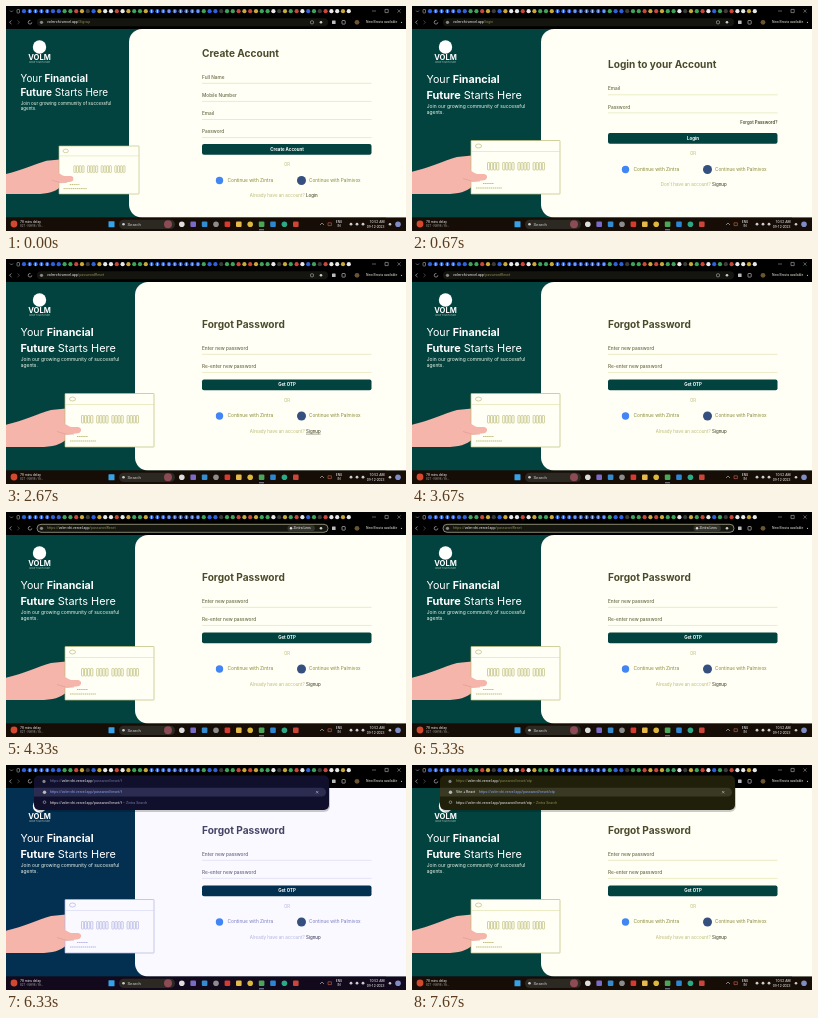
Animation of 400 by 225 pixels, one loop 8000 ms. Source, as an HTML page with a canvas:

```html
<!DOCTYPE html>
<html lang="en">
<head>
<meta charset="utf-8">
<title>Account pages</title>
<style>
html, body { margin: 0; width: 100%; height: 100%; overflow: hidden; background: #000; }
canvas { display: block; width: 400px; height: 225px; }
</style>
</head>
<body>
<canvas id="stage"></canvas>
<script>
const canvas = document.getElementById('stage');
const ratio = window.devicePixelRatio || 1;
canvas.width = 400 * ratio;
canvas.height = 225 * ratio;
const ctx = canvas.getContext('2d');
ctx.scale(ratio, ratio);
ctx.textBaseline = 'middle';

const LOOP = 8000;
const HOST = 'volm-chi.vercel.app';

const warm = {
  panel: '#03433f', paper: '#fffff6', ink: '#4b4b2c', label: '#6a6a45', accent: '#8a8a35',
  faint: '#bcbc78', rule: '#dedea4', menu: '#1f1f0a', row: '#3a3a24', dim: '#8c8c55', bar: '#160d06'
};
const cool = {
  panel: '#032f50', paper: '#f9f9ff', ink: '#444466', label: '#656585', accent: '#7d7dc4',
  faint: '#b2b2e2', rule: '#d6d6f2', menu: '#10102c', row: '#2c2c50', dim: '#7777a8', bar: '#120a1c'
};
let theme = warm;

const wideCard = { edge: 129, zoom: 1, card: [59, 134.5, 89, 53.5] };
const pages = {
  signup: {
    path: '/Signup', title: 'Create Account', titleY: 47.5, fieldY: 71.5,
    fields: ['Full Name', 'Mobile Number', 'Email', 'Password'],
    button: 'Create Account', buttonY: 138, ask: 'Already have an account? ', link: 'Login',
    edge: 123, zoom: 0.92, card: [53, 140, 80, 48]
  },
  login: {
    path: '/login', title: 'Login to your Account', titleY: 59, fieldY: 83,
    fields: ['Email', 'Password'], extra: 'Forgot Password?',
    button: 'Login', buttonY: 127, ask: "Don't have an account? ", link: 'Signup', ...wideCard
  },
  reset: {
    path: '/passwordReset', title: 'Forgot Password', titleY: 66, fieldY: 89.5,
    fields: ['Enter new password', 'Re-enter new password'],
    button: 'Get OTP', buttonY: 120.5, ask: 'Already have an account? ', link: 'Signup', ...wideCard
  }
};

function random(seed) {
  return () => (seed = (seed * 16807) % 2147483647) / 2147483647;
}

function box(x, y, w, h, fill, radius = 0, stroke) {
  ctx.beginPath();
  ctx.roundRect(x, y, w, h, radius);
  if (fill) { ctx.fillStyle = fill; ctx.fill(); }
  if (stroke) { ctx.strokeStyle = stroke; ctx.lineWidth = 0.7; ctx.stroke(); }
}

function dot(x, y, r, fill) {
  ctx.beginPath();
  ctx.arc(x, y, r, 0, 7);
  ctx.fillStyle = fill;
  ctx.fill();
}

function line(points, color, width = 0.6) {
  ctx.beginPath();
  points.forEach(([x, y]) => ctx.lineTo(x, y));
  ctx.strokeStyle = color;
  ctx.lineWidth = width;
  ctx.stroke();
}

function cross(x, y, r, color) {
  line([[x - r, y - r], [x + r, y + r]], color);
  line([[x + r, y - r], [x - r, y + r]], color);
}

// Draws text and returns the x where it ends.
function text(str, x, y, size, color, { weight = 400, align = 'left', family = 'Inter' } = {}) {
  ctx.font = `${weight} ${size}px ${family}, sans-serif`;
  ctx.textAlign = align;
  ctx.fillStyle = color;
  ctx.fillText(str, x, y);
  return x + ctx.measureText(str).width;
}

const ui = (str, x, y, color = '#ddd', size = 3.6, align) =>
  text(str, x, y, size, color, { family: 'Roboto', align });

function drawTabs() {
  const next = random(23);
  const colors = ['#2f62d8', '#e8e8e8', '#c8483c', '#3fa35b', '#c8a93a', '#3b3b3b'];
  box(0, 0, 400, 23, '#000');
  line([[4, 4.5], [5.5, 6], [7, 4.5]], '#aaa');
  box(11, 3.5, 2.5, 3.5, null, 0.5, '#999');
  for (let x = 18; x < 348; x += 5.8) {
    const color = colors[Math.floor(next() * colors.length)];
    const blue = (x > 20 && x < 46) || (x > 140 && x < 196);
    dot(x, 5.2, 2.1, blue ? '#2f62d8' : color);
    if (blue) line([[x, 3.8], [x, 6.8]], '#fff', 0.7);
  }
  line([[366, 5], [370, 5]], '#999');
  box(379, 3.4, 3.2, 3.2, null, 0, '#999');
  cross(393, 5.1, 1.6, '#999');
}

function drawToolbar(path, focused) {
  line([[5.5, 14.5], [3.5, 16.3], [5.5, 18]], '#ccc');
  line([[11.5, 14.5], [13.5, 16.3], [11.5, 18]], '#666');
  ctx.beginPath();
  ctx.arc(24, 16.3, 1.8, 0, 5);
  ctx.strokeStyle = '#ccc';
  ctx.stroke();
  box(31, 12.3, 291, 8, '#151510', 4, focused ? '#bcbc9c' : null);
  dot(35.5, 16.3, 1.6, '#888');
  const start = focused ? ui('https://', 41, 16.4, theme.dim) : 41;
  ui(path, ui(HOST, start, 16.4, '#f4f4f4'), 16.4, theme.dim);
  if (focused) {
    box(281.5, 13.2, 27.5, 6.2, '#33332c', 3.1);
    dot(285, 16.3, 1.2, '#ddd');
    ui('Zintra Lens', 287.5, 16.4, '#eee', 3.5);
  } else {
    box(304.5, 14.8, 3, 3, null, 1, '#aaa');
  }
  dot(315, 16.3, 1.3, '#ccc');
  box(326, 14.5, 3.6, 3.6, '#bbb', 0.5);
  box(336, 14.5, 3.2, 3.6, null, 0.5, '#bbb');
  dot(351, 16.3, 2.4, '#6b5530');
  ui('New Brovia available', 360, 16.4, '#e6e6d8', 3.4);
  dot(395.5, 16.3, 0.6, '#ccc');
}

function drawHandCard([x, y, w, h]) {
  const skin = '#f6b5ab', ink = theme.faint;
  ctx.save();
  ctx.translate(x, y);
  ctx.scale(w / 89, h / 53.5);
  ctx.fillStyle = skin;
  ctx.fill(new Path2D('M-70 33 C-46 30-30 21-14 16.5 L1 15 V46 C-4 51-12 53.5-26 53.5 H-70 Z'));
  box(0, 0, 89, 53.5, theme.paper, 0.5, ink);
  ctx.beginPath();
  ctx.ellipse(7.5, 5.5, 3, 2, 0, 0, 7);
  ctx.stroke();
  line([[0, 11], [89, 11]], theme.rule, 0.6);
  for (let i = 0; i < 16; i++) {
    box(16.5 + i * 3.05 + Math.floor(i / 4) * 3, 22, 2.2, 7.5, null, 0.6, ink);
  }
  ctx.setLineDash([1.5, 0.6]);
  line([[12, 43], [23, 43]], ink, 1.1);
  line([[5, 47.5], [31, 47.5]], ink, 1.1);
  ctx.setLineDash([]);
  ctx.fillStyle = skin;
  ctx.fill(new Path2D('M-10 24 C-3 27 1 32 6 33.5 H13 Q16.5 34 16 37 Q15.5 40 11 40 L0 41 L-10 43 Z'));
  line([[-8, 38], [2, 41], [9, 40.5]], '#dc978e', 0.6);
  ctx.restore();
}

function drawPromo({ edge, zoom, card }) {
  box(0, 23, 400, 188.5, theme.panel);
  box(edge, 23, 290, 188.5, theme.paper, 13);
  box(380, 23, 20, 188.5, theme.paper);
  dot(33.5, 41, 6.7, '#fff');
  text('VOLM', 33.5, 52, 7.6, '#fff', { weight: 700, align: 'center' });
  text('GROW YOUR FUTURE', 33.5, 56.3, 2, '#b9cec0', { align: 'center' });

  ctx.save();
  ctx.translate(14.5, 60);
  ctx.scale(zoom, zoom);
  const bold = { weight: 700 };
  text('Financial', text('Your ', 0, 14, 10.7, '#fff'), 14, 10.7, '#fff', bold);
  text(' Starts Here', text('Future', 0, 29.5, 10.9, '#fff', bold), 29.5, 10.9, '#fff');
  text('Join our growing community of successful', 0.3, 40.4, 4.9, '#eef5e8');
  text('agents.', 0.3, 46.8, 4.9, '#eef5e8');
  ctx.restore();
  drawHandCard(card);
}

function drawForm(page, underlined) {
  const { ink, label, accent, faint, rule, panel } = theme;
  const top = page.buttonY;
  text(page.title, 196, page.titleY, 10.1, ink, { weight: 700 });
  page.fields.forEach((name, i) => {
    const y = page.fieldY + i * 18.1;
    text(name, 196, y, 4.75, label, { weight: 500 });
    line([[196, y + 5.8], [365.5, y + 5.8]], rule);
  });
  if (page.extra) text(page.extra, 365.5, 117, 4.3, ink, { weight: 600, align: 'right' });
  box(196, top, 169.5, 10.8, panel, 2);
  text(page.button, 281, top + 5.6, 4.4, '#fff', { weight: 700, align: 'center' });
  text('OR', 281, top + 21, 4.3, faint, { align: 'center' });
  dot(213.5, top + 36.5, 3.7, '#4285f4');
  text('Continue with Zintra', 221.5, top + 36.5, 4.8, accent);
  dot(295.5, top + 36.5, 4.5, '#35507e');
  text('Continue with Palmivox', 303, top + 36.5, 4.7, accent);

  const y = top + 52;
  text(page.ask, 300, y, 4.5, faint, { align: 'right' });
  const end = text(page.link, 300, y, 4.4, ink, { weight: 500 });
  if (underlined) line([[300, y + 2.6], [end, y + 2.6]], ink, 0.5);
}

function drawSuggestions(path, titled) {
  const url = 'https://' + HOST + path;
  box(29, 12, 295, 35, '#0003', 6);
  box(28, 10.5, 295, 34.5, theme.menu, 5);
  ui(path, ui(HOST, ui('https://', 44, 16.4, theme.dim), 16.4, '#f4f4f4'), 16.4, theme.dim);
  dot(38, 16.4, 1.6, '#888');
  box(28, 22.8, 292, 8.8, theme.row, [0, 4.4, 4.4, 0]);
  dot(38.5, 27.2, 1.7, '#bbb');
  const x = titled ? ui('Vite + React  ', 44, 27.3, '#eee') + 2 : 44;
  ui(url, x, 27.3, '#86a4f4');
  cross(311.2, 27.2, 1.2, '#bbb');
  ctx.beginPath();
  ctx.arc(38.5, 37.2, 1.3, 0, 7);
  ctx.strokeStyle = '#bbb';
  ctx.stroke();
  ui(' – Zintra Search', ui(url, 44, 37.6, '#eee'), 37.6, theme.dim);
}

function drawTaskbar() {
  box(0, 211.5, 400, 13.5, theme.bar);
  dot(8, 218, 3.4, '#d2492f');
  ui('78 mins delay', 14, 216, '#eee', 3.4);
  ui('827 - NH98 / Kt…', 14, 220.5, '#999', 3.1);
  box(102.5, 215.3, 6, 6, '#36a3e8', 0.5);
  box(113, 213.7, 56, 9.4, '#2c2822', 4.7);
  dot(117.5, 218.3, 1.3, '#ccc');
  ui('Search', 121.5, 218.4, '#ccc', 4.4);
  dot(162, 218.2, 4, '#8c4b55');
  const icons = ['#ddd', '#7a6bc8', '#338bd0', '#8c8c8c', '#d73a30', '#e6b94a',
    '#dcb83c', '#4ca65a', '#2d86d4', '#2caa87', '#cb4638'];
  icons.forEach((color, i) => box(173 + i * 11.4, 215.4, 5.6, 5.6, color, i % 3 ? 1 : 2.8));
  line([[253, 223.8], [258, 223.8]], '#9ab8d8', 0.8);
  line([[314, 219], [316, 217], [318, 219]], '#ccc');
  box(322, 216.8, 3.4, 2.8, null, 0, '#b05a4a');
  ui('ENG', 333, 216, '#eee', 3.3, 'center');
  ui('IN', 333, 220.5, '#eee', 3.3, 'center');
  [345, 351, 357].forEach(x => dot(x, 218.2, 1.4, '#ccc'));
  ui('10:52 AM', 378.5, 216, '#eee', 3.5, 'right');
  ui('09-12-2023', 378.5, 220.5, '#eee', 3.5, 'right');
  dot(384, 218.2, 1.3, '#ccc');
  dot(392, 218.2, 2.8, '#7f8cc6');
}

function draw(t) {
  const page = t < 670 ? pages.signup : t < 1330 ? pages.login : pages.reset;
  const hovered = (t >= 330 && t < 670) || (t >= 2670 && t < 3000);
  theme = t >= 5670 && t < 7670 ? cool : warm;
  drawPromo(page);
  drawForm(page, hovered);
  drawTabs();
  drawToolbar(page.path, t >= 4000);
  if (t >= 6000) {
    const typed = t < 6330 ? '' : t < 6670 ? 'f' : 'otp'.slice(0, Math.floor((t - 6670) / 330));
    drawSuggestions('/password/reset/' + typed, t >= 6670);
  }
  drawTaskbar();
}

function tick() {
  draw(performance.now() % LOOP);
  requestAnimationFrame(tick);
}
tick();
</script>
</body>
</html>
```
